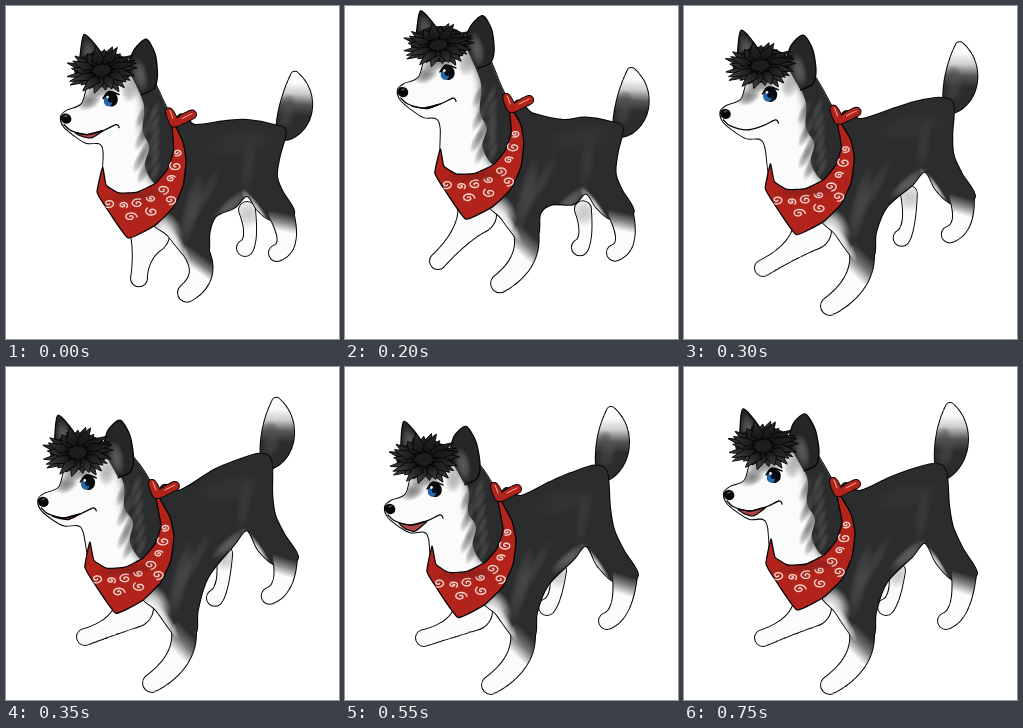
Recreate the animation shown at these times as an HTML page with a canvas. Size 333 by 333 pixels, loop 2.15 s.

```html
<!DOCTYPE html>
<html lang="en">
<head>
<meta charset="utf-8">
<title>Bouncing husky</title>
<style>
html, body { margin: 0; width: 100%; height: 100%; overflow: hidden; background: #fff; }
canvas { display: block; width: 100vw; height: 100vh; }
</style>
</head>
<body>
<canvas id="stage" width="333" height="333"></canvas>
<script>
const ctx = document.getElementById('stage').getContext('2d');
const LOOP = 2150, STEP = 50, REST = 750;
const INK = '#050505', COAT = '#2b2c2d', WHITE = '#fbfbfb', RED = '#b2231b';

const HEAD = ['face', 'brow', 'ears', 'knot', 'bib', 'side'];
const FACE = ['face', 'brow', 'ears'];
const SCARF = ['knot', 'bib', 'side'];
const BODY = ['knot', 'side', 'bib', 'back', 'rump', 'groin', 'hock', 'arm'];
const TAIL = ['rump', 'tail'];
const FORE = ['arm', 'paw'];
const HIND = ['hock', 'hindPaw'];
const FAR_FORE = ['farArm', 'farPaw'];
const FAR_HIND = ['thigh', 'farHind'];

let bones = {}, gape = 0;

const clamp = u => Math.max(0, Math.min(1, u));
function smooth(t, a, b) {
  const u = clamp((t - a) / (b - a));
  return u * u * (3 - 2 * u);
}
const bump = (t, a, b) => Math.sin(Math.PI * clamp((t - a) / (b - a))) ** 2;

function seeded(seed) {
  return () => (seed = seed * 16807 % 2147483647) / 2147483647;
}

// A hop lifts the front, a dive lifts the rear, then the front sags and rebounds.
function setPose(t) {
  const shift = 1 - smooth(t, 140, 430);
  const reach = 1 - smooth(t, 0, 300);
  const hop = Math.sin(Math.PI / 2 * clamp((t + 60) / 250)) * (1 - smooth(t, 230, 370));
  const dive = bump(t, 180, 480);
  const sag = bump(t, 280, 640);
  const rebound = 13 * bump(t, 550, 750);

  const headX = 15 * shift - 11 * dive, headY = 28 * sag - 42 * hop - rebound;
  const chestX = 9 * shift - 5 * dive, chestY = 15 * sag - 30 * hop - rebound / 2;
  const rise = -18 * dive;
  const bone = (x, y, dx, dy) => ({ x, y, dx, dy });
  bones = {
    face: bone(55, 130, headX, headY),
    brow: bone(95, 105, headX, headY),
    ears: bone(90, 45, headX + 5 * shift, headY * 0.87),
    knot: bone(154, 121, 14 * shift - 6 * dive, 10 * sag - 23 * hop - rebound / 3),
    bib: bone(100, 215, chestX, chestY),
    side: bone(171, 165, chestX, chestY),
    back: bone(205, 111, 15 * shift, 4 * shift - 12 * dive + 8 * sag),
    rump: bone(250, 97, 18 * shift, 22 * shift - 16 * dive + 3 * sag),
    tail: bone(268, 55, 23 * shift, 30 * shift - 14 * dive + 8 * sag),
    groin: bone(241, 175, 0, 14 * shift + rise + 6 * sag),
    hock: bone(280, 208, -5 * shift, rise + 3 * sag),
    hindPaw: bone(264, 257, 9 * shift, -7 * shift - 25 * dive),
    thigh: bone(212, 208, 28 * shift, rise),
    farHind: bone(203, 240, 37 * shift, 2 * shift - 10 * dive),
    arm: bone(184, 264, 12 * reach, -38 * hop - 6 * reach),
    paw: bone(149, 318, 35 * reach, -36 * hop - 18 * reach),
    farArm: bone(128, 243, 16 * reach, 8 * sag - 32 * hop),
    farPaw: bone(80, 271, 54 * reach, 8 * reach - 18 * hop)
  };
  gape = clamp(0.6 - 0.5 * hop - 0.5 * dive + 0.35 * sag);
}

// Moves a resting point along with the nearby bones of its part.
function warp(x, y, part) {
  let sum = 0, dx = 0, dy = 0;
  for (const name of part) {
    const b = bones[name];
    const w = ((x - b.x) ** 2 + (y - b.y) ** 2 + 12) ** -1.4;
    sum += w; dx += w * b.dx; dy += w * b.dy;
  }
  return [x + dx / sum, y + dy / sum];
}

function outline(pts, part, curve = 1, open = false) {
  const q = [], path = new Path2D();
  for (let i = 0; i < pts.length; i += 2) q.push(warp(pts[i], pts[i + 1], part));
  const n = q.length, k = curve / 6;
  const at = i => open ? q[Math.max(0, Math.min(n - 1, i))] : q[(i + n) % n];
  path.moveTo(...q[0]);
  for (let i = 0; i < (open ? n - 1 : n); i++) {
    const a = at(i - 1), b = at(i), c = at(i + 1), d = at(i + 2);
    path.bezierCurveTo(b[0] + (c[0] - a[0]) * k, b[1] + (c[1] - a[1]) * k,
      c[0] - (d[0] - b[0]) * k, c[1] - (d[1] - b[1]) * k, c[0], c[1]);
  }
  if (!open) path.closePath();
  return path;
}

// Tapered limb: a chain of discs through three x, y, radius nodes.
function limb(a, b, c, part) {
  const path = new Path2D();
  const nodes = [a, b, c].map(([x, y, r]) => [...warp(x, y, part), r]);
  for (let i = 0; i <= 40; i++) {
    const u = i / 40;
    const [x, y, r] = [0, 1, 2].map(j => {
      const [p, q, s] = nodes.map(n => n[j]);
      return p + u * (4 * q - 3 * p - s) + 2 * u * u * (p - 2 * q + s);
    });
    path.moveTo(x + r, y);
    path.arc(x, y, r, 0, 2 * Math.PI);
  }
  return path;
}

function stroke(path, color = INK, width = 1.3) {
  ctx.strokeStyle = color;
  ctx.lineWidth = width;
  ctx.stroke(path);
}

function fill(path, color) {
  ctx.fillStyle = color;
  ctx.fill(path);
}

// Edges first, so that the fills join into one silhouette.
function join(...shapes) {
  shapes.forEach(([path]) => stroke(path, INK, 2));
  shapes.forEach(([path, color]) => fill(path, color));
}

const line = (pts, part, color = INK, width = 1.3) => stroke(outline(pts, part, 1, true), color, width);

function fade(x1, y1, x2, y2, part, ...stops) {
  const g = ctx.createLinearGradient(...warp(x1, y1, part), ...warp(x2, y2, part));
  stops.forEach((c, i) => g.addColorStop(i / (stops.length - 1), c));
  return g;
}

function oval(x, y, rx, ry, turn, part, color) {
  const path = new Path2D();
  path.ellipse(...warp(x, y, part), rx, ry, turn, 0, 2 * Math.PI);
  fill(path, color);
}

// Feathered patch of one grey level.
function soft(x, y, rx, ry, turn, part, grey, alpha) {
  ctx.save();
  ctx.translate(...warp(x, y, part));
  ctx.rotate(turn);
  ctx.scale(rx, ry);
  const g = ctx.createRadialGradient(0, 0, 0, 0, 0, 1);
  [1, 0.7, 0].forEach((a, i) => g.addColorStop(i / 2, `rgba(${grey},${grey},${grey},${a * alpha})`));
  ctx.fillStyle = g;
  ctx.fillRect(-1, -1, 2, 2);
  ctx.restore();
}

function within(path, draw) {
  ctx.save();
  ctx.clip(path);
  draw();
  ctx.restore();
}

function farLegs() {
  const hind = limb([213, 204, 8], [210, 227, 6], [202, 240, 8], FAR_HIND);
  join([hind, WHITE]);
  within(hind, () => soft(214, 208, 14, 14, 0, FAR_HIND, 150, 0.5));
  join([limb([128, 240, 19], [108, 257, 10], [79, 271, 8], FAR_FORE), WHITE]);
}

function tail() {
  const path = limb([260, 104, 8], [268, 73, 16], [266, 40, 4], TAIL);
  join([path, fade(266, 36, 266, 108, TAIL, WHITE, WHITE, '#ccc', '#555', COAT, COAT, COAT)]);
  within(path, () => {
    soft(260, 68, 8, 9, 0.4, TAIL, 70, 0.5);
    soft(262, 86, 9, 15, 0.3, TAIL, 95, 0.4);
  });
}

function body() {
  const torso = outline([156,122, 176,124, 205,111, 226,103, 250,97, 262,104, 265,138, 269,160,
    279,182, 293,207, 271,214, 253,197, 241,176, 228,190, 203,215, 192,245, 190,268, 176,278,
    152,246, 135,215], BODY);
  const hind = limb([280, 207, 12], [275, 239, 9], [262, 254, 8], HIND);
  const fore = limb([178, 266, 12], [171, 294, 11], [146, 318, 9], FORE);
  join([torso, COAT],
    [hind, fade(282, 207, 276, 226, HIND, COAT, '#888', WHITE)],
    [fore, fade(188, 272, 171, 289, FORE, COAT, '#777', WHITE)]);
  within(torso, () => {
    soft(146, 240, 20, 24, -0.5, BODY, 252, 1);
    soft(157, 256, 9, 26, -0.6, BODY, 252, 1);
    soft(176, 214, 9, 42, 0.25, BODY, 95, 0.5);
    soft(190, 196, 7, 34, 0.5, BODY, 85, 0.4);
    soft(224, 188, 24, 7, -0.7, BODY, 130, 0.6);
    soft(238, 148, 8, 30, 0.15, BODY, 75, 0.4);
    soft(222, 130, 40, 15, -0.2, BODY, 62, 0.4);
    soft(251, 196, 6, 26, -0.6, BODY, 245, 1);
  });
}

function ear(pts, x, y) {
  const path = outline(pts, FACE, 0.8, true);
  fill(path, '#262627');
  stroke(path);
  within(path, () => soft(x, y, 8, 18, -0.2, FACE, 120, 0.65));
}

function head() {
  const skull = outline([40,126, 46,120, 61,113, 70,88, 100,72, 125,78, 143,104, 158,138,
    156,174, 130,199, 105,203, 88,192, 84,160, 79,152, 66,152, 55,146, 43,136], HEAD, 0.9);
  join([skull, WHITE]);
  within(skull, () => {
    ctx.shadowColor = '#555';
    ctx.shadowBlur = 9;
    fill(outline([105,72, 130,74, 152,112, 168,140, 166,175, 142,190, 128,172, 131,152,
      123,136, 123,110], HEAD), COAT);
    ctx.shadowBlur = 0;
    for (let i = 0; i < 6; i++) {
      soft(122 + i % 2 * 5, 122 + i * 11, 5, 14, 0.45, HEAD, 80, 0.5);
      soft(134 + i, 116 + i * 12, 4, 13, 0.4, HEAD, 120, 0.35);
    }
    soft(68, 110, 14, 9, -0.5, FACE, 80, 0.7);
    soft(80, 99, 20, 8, 0, FACE, 70, 0.6);
    soft(108, 99, 9, 14, 0, FACE, 110, 0.5);
  });
  ear([56,84, 56,62, 59,42, 74,58, 82,74], 65, 64);
  ear([104,76, 109,57, 121,47, 131,62, 135,84, 132,98, 120,104], 118, 84);
  mouth();
  eye();
  hair();
}

function mouth() {
  if (gape > 0.05) {
    const lips = outline([54,142, 66,144, 82,140, 70,144 + 8 * gape, 60,143 + 6 * gape], FACE, 0.6);
    fill(lips, '#b0454a');
    stroke(lips, INK, 1.2);
  }
  line([43,134, 50,140, 66,144, 82,140, 95,134, 98,137], FACE);
  oval(45, 128, 5.5, 5, 0.5, FACE, INK);
  oval(45, 125.5, 2, 0.9, -0.3, FACE, '#555');
}

function eye() {
  oval(90, 108.5, 6.8, 7.6, -0.3, FACE, '#07090c');
  oval(87, 111, 4.2, 4.8, -0.3, FACE, '#2467a8');
  oval(89.5, 108.5, 2.8, 3.6, 0, FACE, '#071018');
  oval(86.5, 106.5, 1.3, 1.4, 0, FACE, '#fff');
  line([82,108, 88,101, 98,104], FACE, INK, 1.5);
}

// Overlapping pointed locks fanned around the crown.
function hair() {
  const rnd = seeded(41);
  oval(80, 78, 29, 18, 0, FACE, '#1c1d1e');
  for (let i = 0; i < 30; i++) {
    const a = i * 2.4, r = 0.8 + 0.25 * rnd();
    const spot = (turn, d) => [79 + 36 * d * Math.cos(a + turn), 79 + 25 * d * Math.sin(a + turn)];
    const tip = spot(0.12, r);
    const grey = Math.round(34 + 26 * clamp((tip[1] - tip[0] / 2 - 20) / 50) + 12 * rnd());
    const lock = outline([...spot(-0.35, 0.5), ...tip, ...spot(0.35, 0.5), ...spot(0, 0.25)], FACE, 0.15);
    fill(lock, fade(...spot(0, 0.3), ...tip, FACE, '#151617', `rgb(${grey},${grey},${grey})`));
    stroke(lock, INK, 1);
  }
}

function swirl(angle, reach, size) {
  const [cx, cy] = warp(108 + reach * Math.cos(angle), 160 + reach * Math.sin(angle) * 0.93, SCARF);
  const path = new Path2D();
  for (let i = 0; i <= 24; i++) {
    const a = angle * 7 + i * 0.36, d = size * (0.15 + 0.85 * i / 24);
    path.lineTo(cx + d * Math.cos(a) * 1.2, cy + d * Math.sin(a) * 0.85);
  }
  stroke(path, '#f3d3cb', 1.4);
}

function scarf() {
  const knot = ['knot'];
  const cloth = outline([87,172, 82,197, 92,214, 113,243, 140,230, 158,212, 168,190, 171,166,
    167,147, 152,122, 158,155, 152,174, 140,188, 122,197, 104,198, 91,190], SCARF, 0.4);
  fill(cloth, RED);
  stroke(cloth);
  within(cloth, () => {
    for (let i = 0; i < 8; i++) swirl(i * 0.27 - 0.05, 54, 4 + i % 2 * 1.5);
    for (let i = 0; i < 3; i++) swirl(0.8 + i * 0.33, 67, 5.5);
    soft(122, 200, 36, 7, -0.1, SCARF, 20, 0.2);
  });
  join([limb([154, 125, 4], [151, 118, 4], [149, 114, 3], knot), RED],
    [limb([156, 126, 3], [164, 121, 4], [172, 117, 4], knot), RED]);
  line([150,113, 153,121], knot, '#f0b9ae', 1);
  line([162,121, 166,119, 172,116], knot, '#f0b9ae', 1);
}

function draw(now) {
  setPose(Math.min(REST, Math.floor(now % LOOP / STEP) * STEP));
  ctx.fillStyle = '#fff';
  ctx.fillRect(0, 0, 333, 333);
  farLegs();
  tail();
  body();
  head();
  scarf();
}

ctx.lineJoin = ctx.lineCap = 'round';
const start = performance.now();
function tick() {
  draw(performance.now() - start);
  requestAnimationFrame(tick);
}
tick();
</script>
</body>
</html>
```
